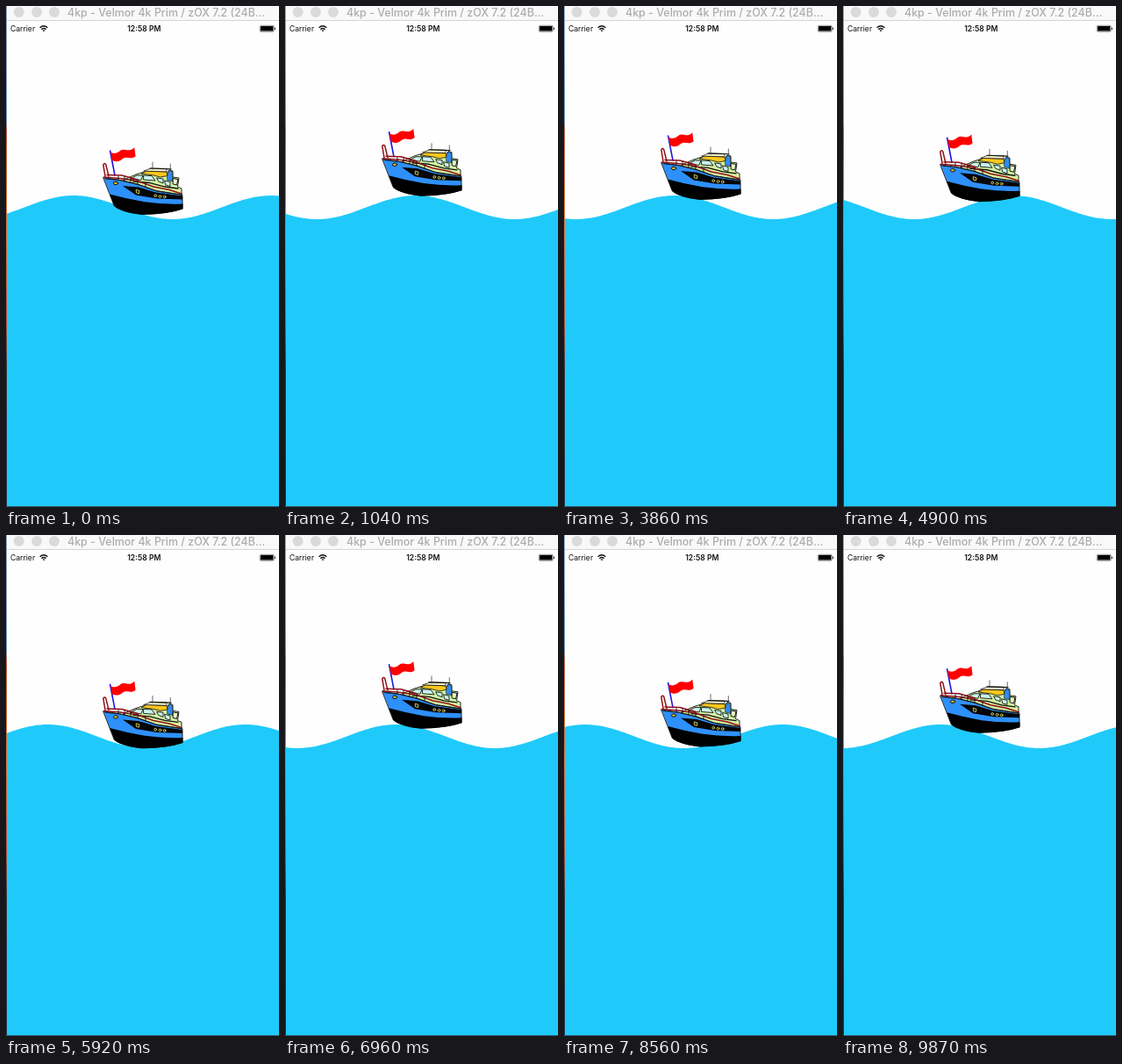
Recreate the animation shown at these times as an HTML page. Size 311x571 px, loop 9.97 s.

```html
<!DOCTYPE html>
<html lang="en">
<head>
<meta charset="utf-8">
<title>Boat on a wave</title>
<style>
html, body { margin: 0; width: 100%; height: 100%; overflow: hidden; background: #fff; }
svg { display: block; width: 311px; height: 571px; }
text { font-family: Inter, Roboto, "Liberation Sans", sans-serif; }
</style>
</head>
<body>
<svg viewBox="0 0 311 571" xmlns="http://www.w3.org/2000/svg">
  <defs>
    <linearGradient id="desktop" x1="0" y1="0" x2="0" y2="1">
      <stop offset="0" stop-color="#7f9dbb"/>
      <stop offset=".23" stop-color="#5f86b4"/>
      <stop offset=".25" stop-color="#a5542f"/>
      <stop offset=".45" stop-color="#d8692a"/>
      <stop offset=".64" stop-color="#a8432a"/>
      <stop offset=".72" stop-color="#3a2c33"/>
      <stop offset="1" stop-color="#1c2733"/>
    </linearGradient>
  </defs>
  <rect width="311" height="571" fill="#fefefe"/>

  <!-- window title bar -->
  <rect width="311" height="17" fill="#f9f9f9"/>
  <rect y="16" width="311" height="1" fill="#d4d4d4"/>
  <g fill="#dadada">
    <circle cx="14.7" cy="7" r="6"/><circle cx="35" cy="7" r="6"/><circle cx="55" cy="7" r="6"/>
  </g>
  <text x="70" y="12" font-size="12.45" font-weight="500" fill="#acacac">4kp - Velmor 4k Prim / zOX 7.2 (24B...</text>

  <!-- status bar -->
  <text x="5" y="29" font-size="8.6" fill="#111">Carrier</text>
  <g fill="none" stroke="#111" stroke-width="1.4">
    <path d="M38.6 24.8Q43 20.8 47.4 24.8M40.4 26.7Q43 24.4 45.6 26.7"/>
    <path d="M43 29.2L41.6 27.8Q43 26.8 44.4 27.8Z" fill="#111" stroke="none"/>
  </g>
  <text x="157.3" y="29" font-size="8.6" font-weight="600" text-anchor="middle" fill="#111">12:58 PM</text>
  <rect x="289.2" y="22.3" width="16" height="7" rx="1.3" fill="#fff" stroke="#222" stroke-width=".5"/>
  <rect x="290" y="23" width="14.4" height="5.6" rx=".6" fill="#000"/>
  <rect x="305.9" y="24.6" width="1" height="2.5" rx=".5" fill="#222"/>

  <path id="sea" fill="#1fcafb"/>

  <g id="boat" stroke-linejoin="round" stroke-linecap="round">
    <!-- flag -->
    <path d="M118.6 165L124 193" stroke="#1b14e6" stroke-width="1.6"/>
    <path d="M119 166.5C124 169.5 128 167 131 164.3C135 161.8 140 167.5 146.3 161.3L147.6 171.3C142 176 138 170.5 133 174C129 177.5 125 178 120.8 176Z" fill="#fe0000"/>
    <!-- cabin -->
    <path d="M134 198L141 195L148 192L156 189.5L183 191L186 187L190 188L190 195L197 196L195.5 206L200 208L200 217L170 212L140 203Z" fill="#d2f3a4" stroke="#111" stroke-width=".9"/>
    <path d="M154.5 191L160 188L183 189L184 193.5L176 195L168 193Z" fill="#fcc81c" stroke="#111" stroke-width=".8"/>
    <path d="M157 188L165 185L183 185.5L183 188.5Z" fill="#f4efc8" stroke="#111" stroke-width=".7"/>
    <path d="M183.5 194L186 187L189.5 189L190 200L184 198.5Z" fill="#2e8cf0" stroke="#111" stroke-width=".6"/>
    <path d="M164 185L188 185.8" fill="none" stroke="#111" stroke-width="1.2"/>
    <path d="M167 178V186M187.3 180V186.5" stroke="#444" stroke-width=".8"/>
    <g fill="#c9f5ee" stroke="#111" stroke-width=".9">
      <path d="M142 196.8L149 193L156 193L154 198Z"/>
      <path d="M157 193L166 193.5L170 199L157 198Z"/>
      <path d="M172 196L179 197L179 202L174 200Z"/>
      <path d="M181 199L187 200.5L187 205.5L182 204Z"/>
    </g>
    <path d="M190.5 196.5L196 197.5L194.5 204L190.5 203Z" fill="#e5f8c3" stroke="#111"/>
    <path d="M145 200L164 201.5L181 206L196 208" fill="none" stroke="#111" stroke-width="1.3"/>
    <path d="M161 203.6L178 207.4M183 209L197 211.5" stroke="#f3e88c" stroke-width="1.3"/>
    <!-- hull -->
    <path d="M111 195.5L130 198.5L150 203.5L172 211L201 215.5L201 231Q185 236.8 155 237.5Q132 235 123.5 228Z" fill="#2e90fa" stroke="#111" stroke-width=".9"/>
    <path d="M118.3 214.5Q138 220 158 223.3Q180 226.5 201.5 225.5V231.5Q184 237.3 155 237.7Q131 235.3 123.6 228.3Z" fill="#000"/>
    <path d="M133 205L151 206.5L171 212.5L201 216.5V220.5L172 219.5L148 215.5Z" fill="#050505"/>
    <g fill="#111" stroke="#dcd55c" stroke-width=".9">
      <path d="M148.6 209.5L152 210.5L151.5 213.8L148.8 213Z"/>
      <circle cx="170.2" cy="216.2" r="1.4"/><circle cx="175.5" cy="217" r="1.4"/><circle cx="180.7" cy="217.5" r="1.4"/>
    </g>
    <ellipse cx="125" cy="202" rx="2.6" ry="1.7" fill="#d6be35" stroke="#111"/>
    <!-- rails -->
    <g fill="none" stroke="#8f1018" stroke-width="1.5">
      <path d="M111.5 195L130 196.5L150 199.5L168 206L186 209.5L200 214"/>
      <path d="M117 194L113.7 180.5Q112 178.5 110.8 181L113 194"/>
      <path d="M115 192.5L132 193L150 198"/>
    </g>
    <path d="M113 196.8L131 198.7L150 203L171 210.5L200 215" fill="none" stroke="#111" stroke-width=".9"/>
    <path d="M128 194V198M135 194.5V199.5M142 196.5V201M150 199V203.5M159 202.5V206.5" stroke="#111" stroke-width=".9"/>
  </g>

  <rect width="1" height="571" fill="url(#desktop)"/>
  <rect y="570" width="311" height="1" fill="#38566a"/>
</svg>
<script>
const LOOP = 9970, STEP = 147.3, LAST_STEP = 67;
const WAVELENGTH = 225, AMPLITUDE = 13.5, SEA_LEVEL = 229.5;
const BOAT_X = 156, BOAT_REST = 237.5;
// [step, crest x]: the wave drifts right at a slightly uneven pace
const DRIFT = [[0, 77], [15, 231], [26, 351], [33, 418.5], [47, 576.5], [58, 699], [LAST_STEP, 786]];

const sea = document.getElementById('sea');
const boat = document.getElementById('boat');

function crestAt(step) {
  const i = Math.max(1, DRIFT.findIndex(([s]) => s >= step));
  const [s0, x0] = DRIFT[i - 1], [s1, x1] = DRIFT[i];
  return x0 + (x1 - x0) * (step - s0) / (s1 - s0);
}

const waveY = (x, crest) =>
  SEA_LEVEL - AMPLITUDE * Math.cos(2 * Math.PI * (x - crest) / WAVELENGTH);

function draw(time) {
  const step = Math.min(LAST_STEP, Math.floor(time % LOOP / STEP));
  const crest = crestAt(step);
  let d = 'M1 571';
  for (let x = 1; x <= 311; x += 2) d += `L${x} ${waveY(x, crest).toFixed(2)}`;
  sea.setAttribute('d', d + 'V571Z');
  boat.setAttribute('transform', `translate(0 ${(waveY(BOAT_X, crest) - BOAT_REST).toFixed(2)})`);
}

const start = performance.now();
function tick() {
  draw(performance.now() - start);
  requestAnimationFrame(tick);
}
tick();
</script>
</body>
</html>
```
